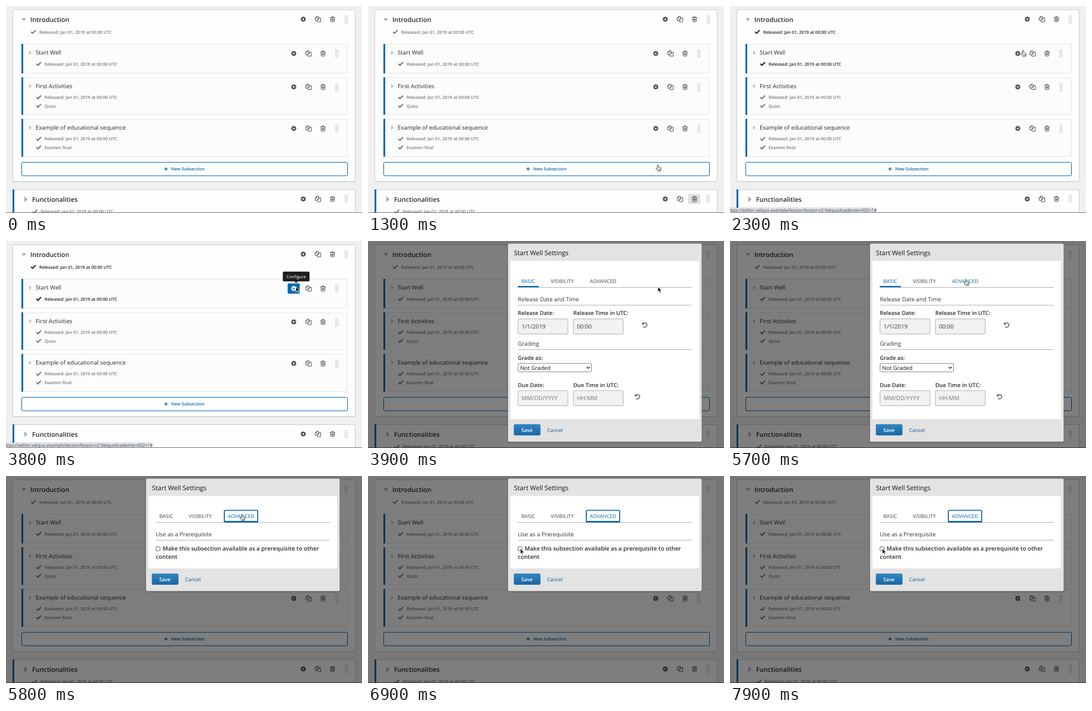
Animation, 600 px wide and 350 px high, one loop 8000 ms. Source, as an HTML page:

```html
<!DOCTYPE html>
<html lang="en">
<head>
<meta charset="utf-8">
<title>Course outline</title>
<style>
  html, body { margin: 0; width: 100%; height: 100%; overflow: hidden; background: #f0f0f0; }
  svg { display: block; width: 600px; height: 350px; }
  text { font-family: "Open Sans", "Noto Sans", sans-serif; white-space: pre; text-rendering: geometricPrecision; }
  .semi { font-weight: 600; }
  .info { fill: #777; color: #777; }
  .info.dark { fill: #222; color: #222; }
</style>
</head>
<body>
<svg id="stage" viewBox="0 0 600 350" xmlns="http://www.w3.org/2000/svg">
  <defs>
    <g id="gear" fill="none" stroke="currentColor">
      <circle r="2.5" stroke-width="2"/>
      <circle r="3.8" stroke-width="1.5" pathLength="16" stroke-dasharray="1 1" stroke-dashoffset=".5"/>
    </g>
    <g id="copy" fill="none" stroke="currentColor" stroke-width=".9" stroke-linejoin="round">
      <path d="M-.9 2.3H-4.6V-1.9L-2-4.6H.9V-2.2M-2-4.6V-1.9H-4.6"/>
      <path d="M-.9 .4L1.6-2.2H4.7V4.7H-.9ZM1.6-2.2V.4H-.9"/>
    </g>
    <g id="trash" fill="none" stroke="currentColor" stroke-width=".9">
      <path d="M-4.3-2.7H4.3M-1.7-2.9L-1.2-4.4H1.2L1.7-2.9M-3.2-2.5V3.4Q-3.2 4.5-2.2 4.5H2.2Q3.2 4.5 3.2 3.4V-2.5M-1.4-.9V2.8M0-.9V2.8M1.4-.9V2.8"/>
    </g>
    <path id="grip" d="M-2.5 -6V7M-.5 -6V7M1.5 -6V7" fill="none" stroke="#aaa" stroke-dasharray="1 1"/>
    <path id="check" d="M-3.8 .2L-1.2 2.7L4-2.6" fill="none" stroke="currentColor" stroke-width="2"/>
    <g id="undo" fill="none" stroke="#444" stroke-width="1.3">
      <path d="M-2.9-2.2A3.7 3.7 0 1 1-2.6 2.7"/>
      <path d="M-4.4-4.6V-.8H-.6Z" fill="#444" stroke="none"/>
    </g>
    <path id="arrow" d="M0 0V9.2L2.1 7.3L3.5 10.5L5.1 9.8L3.7 6.7H6.5Z" fill="#111" stroke="#fff" stroke-width=".8"/>
    <path id="hand" d="M-.9 .8Q-.9-.2 0-.2T.9 .8V4Q1.7 3.4 2.4 4.2Q3.2 3.7 3.9 4.6Q5.2 4.2 5.2 5.6V7.6Q5.2 9 4.3 10.6H-.2Q-1.2 9-3 7Q-3.6 6-2.8 5.6Q-1.9 5.4-.9 6.6ZM1.1 7V9M2.5 7V9M3.8 7V9" fill="#fff" stroke="#222" stroke-width=".75" stroke-linejoin="round"/>
    <linearGradient id="save" x2="0" y2="1">
      <stop offset="0" stop-color="#2f86c3"/><stop offset="1" stop-color="#1a66a3"/>
    </linearGradient>
    <filter id="soft" x="-10%" y="-10%" width="120%" height="120%">
      <feDropShadow dx="0" dy="1" stdDeviation="1.3" flood-opacity=".4"/>
    </filter>
  </defs>
</svg>
<script>
const LOOP = 8000, STEP = 100, BLUE = '#0069b0', INK = '#292929';
const stage = document.getElementById('stage');

const text = (x, y, size, str, extra = '') => `<text x="${x}" y="${y}" font-size="${size}" ${extra}>${str}</text>`;
const semi = (x, y, size, str, fill = INK) => text(x, y, size, str, `class="semi" fill="${fill}"`);
const rect = (x, y, w, h, fill, extra = '') => `<rect x="${x}" y="${y}" width="${w}" height="${h}" fill="${fill}" ${extra}/>`;
const use = (id, x, y, extra = '') => `<use href="#${id}" x="${x}" y="${y}" ${extra}/>`;
const line = y => rect(252.5, y, 293, 1, '#b4b4b4');

const tools = (x, y) => `<g color="#444">${use('gear', x, y)}${use('copy', x + 24.7, y)}${use('trash', x + 49.3, y)}${use('grip', Math.round(x + 72.8), Math.round(y))}</g>`;
const note = (x, y, str) => use('check', x - 10, y - 3) + text(x, y, 7.27, str, 'class="semi"');
const released = (x, y) => note(x, y, 'Released: Jan 01, 2019 at 00:00 UTC');

// Outline rows: top, height, title, second note
const rows = [
  [64, 50, 'Start Well', ''],
  [120.5, 63.5, 'First Activities', 'Quizz'],
  [190.8, 64, 'Example of educational sequence', 'Examen final']
];

function row([y, h, title, extra], i) {
  return rect(26.5, y + .5, 549, h - .7, '#fcfcfc', 'stroke="#e3e3e3" stroke-width=".9"') +
    rect(26, y, 3, h, BLUE) +
    `<path d="M39.2 ${y + 11.8}V${y + 18.2}L43 ${y + 15}Z" fill="#b2b2b2"/>` +
    text(50, y + 18.1, 9.72, title, `fill="${INK}"`) +
    `<g class="info" id="row${i}">${released(65, y + 36.6)}${extra && note(65, y + 51, extra)}</g>` +
    tools(485, y + 16.2);
}

const outline =
  rect(0, 0, 600, 350, '#f0f0f0') +
  rect(11.4, 7, 577.2, 290.6, '#dcdcdc', 'rx="1"') +
  rect(11.4, 6.4, 577.2, 290.2, '#fefefe', 'stroke="#c2c2c2" stroke-width=".8" rx="1"') +
  '<path d="M26 20.8H34L30 25.4Z" fill="#a8a8a8"/>' +
  semi(41, 27, 10.9, 'Introduction') + tools(501, 22.2) +
  `<g class="info" id="card0">${released(56, 46.5)}</g>` +
  rows.map(row).join('') +
  rect(26.5, 264.3, 549, 22.7, '#fff', `rx="2" stroke="${BLUE}" stroke-width="1"`) +
  `<path d="M267 275.5H272.4M269.7 272.8V278.2" stroke="${BLUE}" stroke-width="1.5"/>` +
  semi(278.5, 278.2, 7.3, 'New Subsection', BLUE) +
  rect(11.4, 310.4, 577.2, 50, '#fefefe', 'stroke="#c4c4c4" stroke-width=".8"') +
  rect(11, 310, 3, 40, BLUE) +
  '<path d="M31 322V331.4L36.2 326.7Z" fill="#a8a8a8"/>' +
  semi(44, 331, 10.85, 'Functionalities') +
  rect(540, 318, 20, 16.5, '#dedede', 'rx="1.5" id="bin"') + tools(501, 326.2) +
  `<g class="info" id="card1">${released(58.5, 350.4)}</g>` +
  rect(0, 349, 600, 1, '#777');

const status = '<g id="status"><path d="M0 341.3H243Q245.5 341.3 245.5 343.5V349H0Z" fill="#dfe2e6" stroke="#b9bcc0" stroke-width=".6"/>' +
  text(0, 347.8, 7.4, 'ttps://editor.velquo.example/lesson/lesson-v2:VelquoAcademie+002+1#', 'fill="#444"') + '</g>';

const tip =
  `<g id="gearOn" color="#fff">${rect(474.7, 71.7, 20.3, 17.3, BLUE, 'rx="1.5"')}${use('gear', 485, 80.2)}</g>` +
  `<g id="tip"><path d="M486 68H492L489 71.2Z" fill="#1d1d1d"/>${rect(466.5, 51.8, 45, 16.4, '#1d1d1d', 'rx="2"')}${text(489, 62.6, 7.3, 'Configure', 'fill="#fff" text-anchor="middle"')}</g>`;

const field = (x, y, str, fill) => rect(x + .4, y, 84, 25.4, '#f2f2f2', 'rx="1.5" stroke="#ababab" stroke-width=".9"') +
  text(x + 6.4, y + 16.3, 9.7, str, `fill="${fill}"`);
const label = (x, y, str) => semi(x, y, 9.3, str);

function modal(id, bottom, body) {
  const foot = bottom - 38.3;
  return `<g id="${id}">` +
    rect(236, 4.5, 326.3, bottom - 4.5, '#e3e3e3', 'rx="2" filter="url(#soft)"') +
    rect(240, 33.7, 318.3, foot - 33.7, '#fff') +
    text(246, 23.7, 10.95, 'Start Well Settings', 'fill="#111"') +
    line(78) + body +
    rect(246.2, foot + 9.2, 44, 18, 'url(#save)', 'rx="1.5" stroke="#1c629b" stroke-width=".7"') +
    semi(258.3, foot + 21.5, 8.6, 'Save', '#fff') +
    text(302, foot + 21.5, 8.5, 'Cancel', 'fill="#0a5590"') + '</g>';
}

const tab = (x, str, on, extra = '') => text(x, 70.5, 8.55, str, `fill="${on ? BLUE : '#444'}" ${extra}`);

const basic = modal('basic', 339.3,
  tab(258.5, 'BASIC', true) + tab(308, 'VISIBILITY') + tab(374, 'ADVANCED', false, 'id="advTab"') +
  rect(252.5, 76, 35.5, 2.2, BLUE) +
  text(252.5, 102, 9.7, 'Release Date and Time', 'fill="#333"') + line(108) +
  label(252.5, 125.2, 'Release Date:') + label(346, 125.2, 'Release Time in UTC:') +
  field(252.5, 131.8, '1/1/2019', '#333') + field(345.8, 131.8, '00:00', '#333') + use('undo', 466.3, 142) +
  text(252.5, 177, 9.7, 'Grading', 'fill="#333"') + line(183) +
  label(252.5, 200.5, 'Grade as:') +
  rect(252.9, 207, 123.7, 14.2, '#fff', 'rx="2" stroke="#777" stroke-width=".9"') +
  text(256.5, 217.6, 9.4, 'Not Graded', 'fill="#111"') +
  '<path d="M368.8 212.7L371.3 215.4L373.8 212.7" fill="none" stroke="#222" stroke-width="1.3"/>' +
  label(252.5, 246.8, 'Due Date:') + label(346, 246.8, 'Due Time in UTC:') +
  field(252.5, 253, 'MM/DD/YYYY', '#777') + field(345.8, 253, 'HH:MM', '#777') + use('undo', 454.3, 263.3));

const advanced = modal('advanced', 194.5,
  tab(258.5, 'BASIC') + tab(308, 'VISIBILITY') +
  rect(368, 58, 56.2, 20, '#fff', 'rx="1.8" stroke="#0b5bbd" stroke-width="1.7"') +
  tab(374, 'ADVANCED', true) + rect(368.5, 76, 55.2, 2, BLUE) +
  text(252.5, 102, 9.7, 'Use as a Prerequisite', 'fill="#333"') + line(108) +
  rect(252.9, 119.7, 6.7, 6.7, '#fff', 'rx="1" stroke="#555" stroke-width=".9"') +
  semi(264, 126.2, 9.7, 'Make this subsection available as a prerequisite to other') +
  semi(252.5, 139.9, 9.7, 'content'));

stage.insertAdjacentHTML('beforeend', outline + status + tip +
  rect(0, 0, 600, 350, '#000', 'id="shade" opacity=".5"') + basic + advanced +
  `<g id="cursor">${use('arrow', 0, 0, 'id="point"')}${use('hand', 0, 0, 'id="press"')}</g>`);

const el = id => document.getElementById(id);

// Pointer tip: time, x, y
const path = [
  [1000, 585, 346], [1200, 546, 319], [1300, 488.6, 268.6],
  [1500, 484, 160], [1700, 491, 92], [1900, 493.6, 74.8],
  [2400, 493.6, 74.8], [2700, 488.6, 77.2], [3900, 488.6, 77.2], [4300, 481.7, 78.2],
  [4800, 481.7, 78.2], [5200, 397.5, 64.8], [6300, 397.5, 64.8],
  [6900, 256.8, 122.5], [8000, 256.8, 122.5]
];

// Visible spans in ms
const spans = {
  cursor: [[1000, 8000]],
  press: [[1200, 1400], [1800, 2700], [5100, 6400]],
  bin: [[1200, 1400]],
  status: [[1900, 3900]],
  gearOn: [[2700, 3900]],
  tip: [[2900, 3900]],
  shade: [[3900, 8000]],
  basic: [[3900, 5800]],
  advanced: [[5800, 8000]]
};

const within = (name, t) => spans[name].some(([a, b]) => t >= a && t < b);

// Each leg speeds up and slows down only where the pointer rests
function pointer(t) {
  const i = path.findIndex(p => p[0] > t);
  if (i < 1) return i ? path[path.length - 1].slice(1) : [600, 400];
  const [t0, x0, y0] = path[i - 1], [t1, x1, y1] = path[i];
  const u = (t - t0) / (t1 - t0);
  const k = t0 < 1900 ? u : u * u * (3 - 2 * u);
  return [x0 + (x1 - x0) * k, y0 + (y1 - y0) * k];
}

function draw(t) {
  for (const name in spans) el(name).style.display = within(name, t) ? '' : 'none';
  el('point').style.display = within('press', t) ? 'none' : '';
  const [x, y] = pointer(t);
  el('cursor').setAttribute('transform', `translate(${x.toFixed(2)} ${y.toFixed(2)})`);
  el('advTab').setAttribute('fill', t >= 5100 ? BLUE : '#444');

  // Hover colour follows the pointer one step late
  const hoverY = t < 3900 ? pointer(t - STEP)[1] : -1;
  const dark = (id, top, h) => el(id).classList.toggle('dark', hoverY >= top && hoverY < top + h);
  rows.forEach(([top, h], i) => dark('row' + i, top, h));
  dark('card0', 6, 291);
  dark('card1', 325, 25);
}

function tick(now) {
  draw(Math.floor(now % LOOP / STEP) * STEP);
  requestAnimationFrame(tick);
}
draw(0);
requestAnimationFrame(tick);
</script>
</body>
</html>
```
